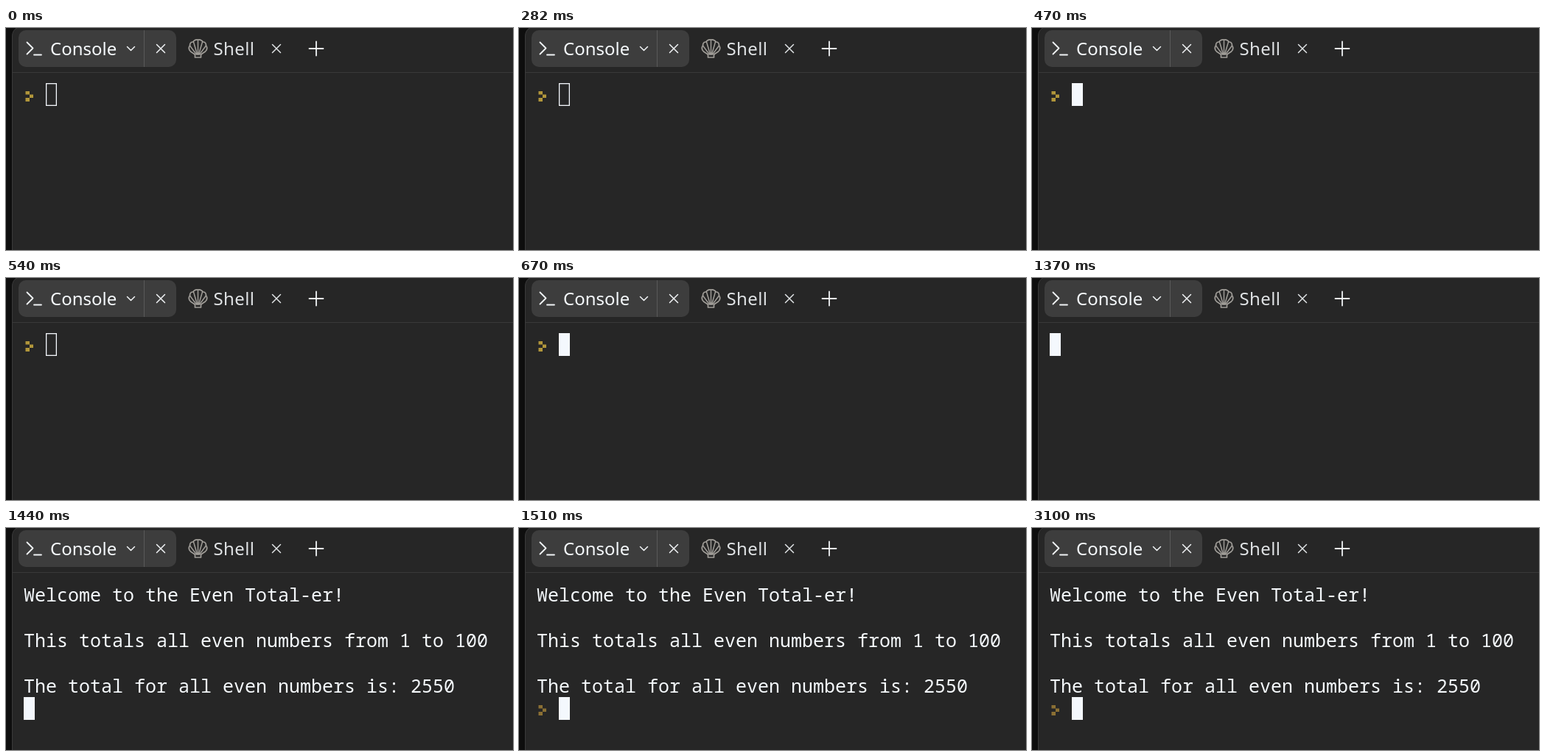
An HTML page for the animation above (4.16 s loop, 688 px wide and 302 px high).

```html
<!DOCTYPE html>
<html lang="en">
<head>
<meta charset="utf-8">
<title>Console</title>
<style>
  html, body { margin: 0; width: 100%; height: 100%; overflow: hidden; background: #0e0e0e; }
  svg { display: block; width: 688px; height: 302px; }
  .label { font: 24px "Noto Sans", "Open Sans", sans-serif; }
  .output { font: 25px "Noto Sans Mono", "DejaVu Sans Mono", monospace; fill: #f5f9fc; white-space: pre; }
  .icon { fill: none; stroke-linecap: round; stroke-linejoin: round; }
</style>
</head>
<body>
<svg viewBox="0 0 688 302">
  <rect width="688" height="302" fill="#0e0e0e"/>
  <path d="M8.5 303V11Q8.5 3 16-1H690V303Z" fill="#262626" stroke="#3a3a3a"/>
  <path d="M9 60.5H688" stroke="#393939"/>

  <rect x="17" y="3" width="214" height="50" rx="10" fill="#3d3d3d"/>
  <path d="M187.5 3V53" stroke="#5a5a5a"/>
  <text class="label" x="60" y="37" fill="#f5f9fc">Console</text>
  <text class="label" x="281.5" y="37" fill="#dfe2e4" letter-spacing=".4">Shell</text>

  <g class="icon" stroke="#f0f3f5" stroke-width="1.8">
    <path d="M28.5 19.5L36.5 27.5L28.5 35.5M38 36.5H48"/>
    <path d="M164.5 25.5L169.5 30.5L174.5 25.5" stroke-width="1.5"/>
    <path d="M204.5 22.5L215.5 33.5M215.5 22.5L204.5 33.5" stroke-width="1.5"/>
    <path d="M361.5 22.5L372.5 33.5M372.5 22.5L361.5 33.5" stroke="#dfe2e4" stroke-width="1.5"/>
    <path d="M411.5 28H430.5M421 18.5V37.5"/>
  </g>

  <g class="icon" stroke="#a09d98" stroke-width="1.7" transform="translate(260.5 28)">
    <path d="M-4 8L-10 4Q-14 0-11-4Q-11-9-7-9Q-4-13 0-12Q4-13 7-9Q11-9 11-4Q14 0 10 4L4 8"/>
    <path d="M-4 8V12H4V8"/>
    <path d="M-2 8L-11-4M-1 8L-6-9M0 8V-12M1 8L6-9M2 8L11-4" stroke-width="1.5"/>
  </g>

  <g id="output" class="output">
    <text x="24" y="100">Welcome to the Even Total-er!</text>
    <text x="24" y="162">This totals all even numbers from 1 to 100</text>
    <text x="24" y="224">The total for all even numbers is: 2550</text>
  </g>
  <path id="prompt" d="M26.5 11H32V15.5H37V20H32V25H26.5V20H32V15.5H26.5Z"/>
  <rect id="cursor" width="13.7" height="29.7" stroke="#f4f8fd" stroke-width="1.3"/>
</svg>
<script>
  const LOOP = 4160;
  const ROW_TOP = 75, ROW_HEIGHT = 31, LEFT = 24, CELL = 15;
  const [output, prompt, cursor] =
    ["output", "prompt", "cursor"].map(id => document.getElementById(id));

  function draw(time) {
    const t = time % LOOP;
    const focused = (t >= 470 && t < 540) || t >= 670;
    const printed = t >= 1440;
    const prompted = t < 1370 || t >= 1510;
    const top = ROW_TOP + (printed ? 5 * ROW_HEIGHT : 0);

    output.style.display = printed ? "" : "none";
    prompt.style.display = prompted ? "" : "none";
    prompt.setAttribute("transform", `translate(0 ${top})`);
    prompt.setAttribute("fill", printed ? "#8b7034" : "#b1963a");
    cursor.setAttribute("x", LEFT + (prompted ? 2 * CELL : 0) + 0.65);
    cursor.setAttribute("y", top + 0.65);
    cursor.setAttribute("fill", focused ? "#f4f8fd" : "none");
  }

  const start = performance.now();
  function tick() {
    draw(performance.now() - start);
    requestAnimationFrame(tick);
  }
  tick();
</script>
</body>
</html>
```
